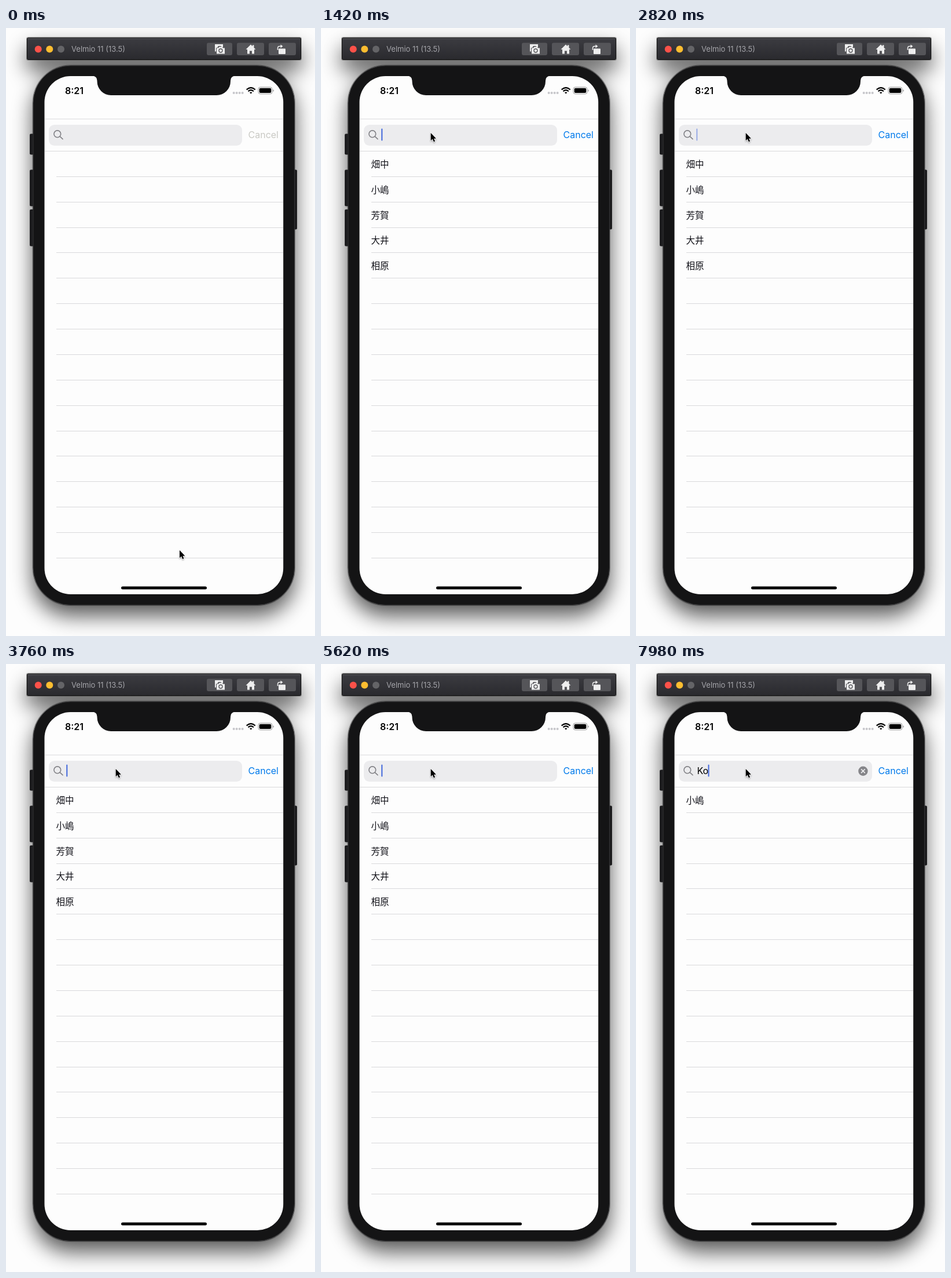
An HTML page that plays this animation: 534 px wide and 1049 px high, repeating every 8000 ms.

```html
<!DOCTYPE html>
<html lang="en">
<head>
<meta charset="utf-8">
<title>Search list</title>
<style>
  html, body { margin: 0; width: 100%; height: 100%; overflow: hidden; background: #fdfdfd; }
  svg { display: block; width: 534px; height: 1049px; }
  text { font: 16px Inter, sans-serif; }
  .row { font: 15.5px "Noto Sans CJK JP", "Noto Sans CJK", sans-serif; fill: #111118; }
</style>
</head>
<body>
<svg viewBox="0 0 534 1049">
  <defs>
    <filter id="soft" x="-20%" y="-10%" width="140%" height="120%"><feGaussianBlur stdDeviation="18"/></filter>
    <filter id="drop" x="-50%" y="-50%" width="200%" height="200%"><feDropShadow dx="0" dy="1.5" stdDeviation="1" flood-opacity=".35"/></filter>
    <linearGradient id="bar" x2="0" y2="1"><stop stop-color="#3c3c41"/><stop offset="1" stop-color="#2a2a2e"/></linearGradient>
    <g id="outline">
      <rect x="36" y="16.5" width="474" height="38.5" rx="2"/>
      <rect x="46.5" y="64.5" width="452.5" height="931.5" rx="65"/>
    </g>
  </defs>

  <!-- one shadow for title bar and phone -->
  <use href="#outline" y="18" opacity=".66" filter="url(#soft)"/>
  <use href="#outline" stroke="#000" stroke-width="2" opacity=".3"/>

  <!-- simulator title bar -->
  <rect x="36.5" y="17" width="473" height="37.5" rx="2" fill="url(#bar)" stroke="#111"/>
  <path d="M38 18.5H508" stroke="#57575c"/>
  <circle cx="55.7" cy="36.5" r="6" fill="#fc5149"/>
  <circle cx="75.3" cy="36.5" r="6" fill="#fdbd30"/>
  <circle cx="95" cy="36.5" r="6" fill="#646467"/>
  <text x="113" y="41.3" fill="#a5a5aa" style="font-size:13px">Velmio 11 (13.5)</text>
  <g fill="#555559">
    <rect x="347" y="25.5" width="44" height="21.5" rx="3"/>
    <rect x="399" y="25.5" width="47" height="21.5" rx="3"/>
    <rect x="454" y="25.5" width="47" height="21.5" rx="3"/>
  </g>
  <g fill="#eee">
    <path d="M361 28H375V33H373L371 31H367L365 34H363V40.5H361Z"/>
    <path d="M364 34.5H367L368.5 32.5H373.500L375 34.5H378V44.5H364Z"/>
    <circle cx="371" cy="39" r="3" fill="none" stroke="#555559" stroke-width="1.3"/>
    <path d="M414.5 37 423 28.5 426 31.5V29.5H428.5V34L431.500 37H429V44.5H425V39.5H421V44.5H417V37Z"/>
    <rect x="471" y="35.5" width="12" height="9.5" rx="1"/>
    <path d="M469.5 38V35Q469.5 31.5 473 31.5H475" fill="none" stroke="#eee" stroke-width="1.5"/>
    <path d="M474.5 28.5 478.500 31.5 474.5 34.5Z"/>
  </g>

  <!-- phone -->
  <g fill="#1c1c1e">
    <rect x="41" y="182.5" width="10" height="36" rx="2"/>
    <rect x="41" y="244.5" width="10" height="63" rx="2"/>
    <rect x="41" y="313" width="10" height="63.5" rx="2"/>
    <rect x="494" y="244.5" width="9" height="103" rx="2"/>
  </g>
  <rect x="47" y="65" width="451.5" height="930.5" rx="64.5" fill="#141415" stroke="#353537"/>
  <rect x="66.5" y="83" width="412.7" height="894" rx="45" fill="#fdfdfd"/>
  <path d="M149 82.5Q157.5 83 157.5 91V92A24 24 0 0 0 181.500 116H364A24 24 0 0 0 388 92V91Q388 83 396.5 82.5Z" fill="#141415"/>

  <!-- status bar -->
  <text x="102" y="113.5" style="font-weight:600">8:21</text>
  <g fill="#c6c6ca">
    <circle cx="393.7" cy="112" r="2"/><circle cx="398.7" cy="112" r="2"/>
    <circle cx="403.7" cy="112" r="2"/><circle cx="408.7" cy="112" r="2"/>
  </g>
  <g fill="none" stroke="#000" stroke-width="2.2">
    <path d="M415.7 106.3Q423.2 99.7 430.7 106.3M418.5 109.2Q423.2 105 427.9 109.2"/>
    <path d="M423.2 113.5 420.9 111.3Q423.2 109.5 425.5 111.3Z" fill="#000" stroke="none"/>
  </g>
  <rect x="436" y="102" width="24" height="11.8" rx="3.5" fill="none" stroke="#999"/>
  <rect x="437.7" y="103.7" width="20.6" height="8.4" rx="2"/>
  <path d="M461.5 106V110Q463 109.5 463 108T461.5 106Z" fill="#999"/>

  <!-- search bar -->
  <rect x="74" y="167" width="334" height="36" rx="9.5" fill="#ececee"/>
  <g fill="none" stroke="#808085" stroke-width="1.6" stroke-linecap="round">
    <circle cx="88.8" cy="182.8" r="5.9"/><path d="M93.2 187.2 98 191.7"/>
  </g>
  <text id="query" x="105.5" y="190" fill="#000"></text>
  <rect id="caret" y="173.5" width="2" height="21" rx="1" fill="#4268dc"/>
  <g id="clear">
    <circle cx="392.4" cy="184.7" r="8.2" fill="#858589"/>
    <path d="M389.5 181.8 395.3 187.6M395.3 181.8 389.5 187.6" stroke="#f2f2f4" stroke-width="1.6" stroke-linecap="round"/>
  </g>
  <text id="cancel" x="418.5" y="190">Cancel</text>

  <path id="lines" stroke="#d9d9db" fill="none"/>
  <g id="rows"></g>
  <rect x="199" y="963.5" width="148" height="5" rx="2.5"/>
  <path id="mouse" d="M0 0V13.2L3 10.600 5.100 15.300 7.400 14.400 5.400 9.800H9.300Z" stroke="#fff" stroke-width="1.2" paint-order="stroke" filter="url(#drop)"/>
</svg>
<script>
const $ = id => document.getElementById(id);
const LOOP = 8000, FOCUS = 1400, STEP = 43.87;
const NAMES = ['畑中', '小嶋', '芳賀', '大井', '相原'];
const typed = [
  { at: 0, text: '', names: [], x: 104.3 },
  { at: FOCUS, text: '', names: NAMES, x: 104.3 },
  { at: 5950, text: 'K', names: NAMES.slice(0, 3), x: 115.3 },
  { at: 7450, text: 'Ko', names: [NAMES[1]], x: 124.5 }
];

let lines = 'M67 157H479M67 212.5H479';
for (let i = 0; i < 16; i++) lines += `M87 ${Math.round(255.8 + i * STEP) + 0.5}H479`;
$('lines').setAttribute('d', lines);

const mix = (a, b, k) => a + (b - a) * k;
const clamp = v => Math.min(1, Math.max(0, v));

function pointer(t) {
  if (t < 820) {
    const k = (t / 820) ** 1.5;
    return [mix(300, 266.5, k), mix(901, 298, k)];
  }
  const k = 1 - (1 - clamp((t - 820) / 330)) ** 2;
  return [mix(266.5, 189.7, k), mix(298, 181, k)];
}

// Solid, fade out, pause, fade in once a second.
function blink(ms) {
  const p = (ms % 1000) / 1000;
  return p < 0.9 ? clamp((0.75 - p) / 0.1) : (p - 0.9) / 0.1;
}

let shown;
function show(state) {
  shown = state;
  $('query').textContent = state.text;
  $('caret').setAttribute('x', state.x);
  $('clear').style.display = state.text ? '' : 'none';
  $('cancel').setAttribute('fill', state.at ? '#007aeb' : '#c9c9c4');
  $('rows').innerHTML = state.names.map((name, i) =>
    `<text class="row" x="86.5" y="${240.8 + i * STEP}">${name}</text>`).join('');
}

function draw(now) {
  const t = now % LOOP;
  const state = typed.findLast(s => s.at <= t);
  if (state !== shown) show(state);
  const blinkStart = state.text ? state.at : 120;
  $('caret').setAttribute('opacity', t < FOCUS ? 0 : blink(t - blinkStart));
  $('mouse').setAttribute('transform', `translate(${pointer(t)})`);
  requestAnimationFrame(draw);
}
draw(0);
</script>
</body>
</html>
```
